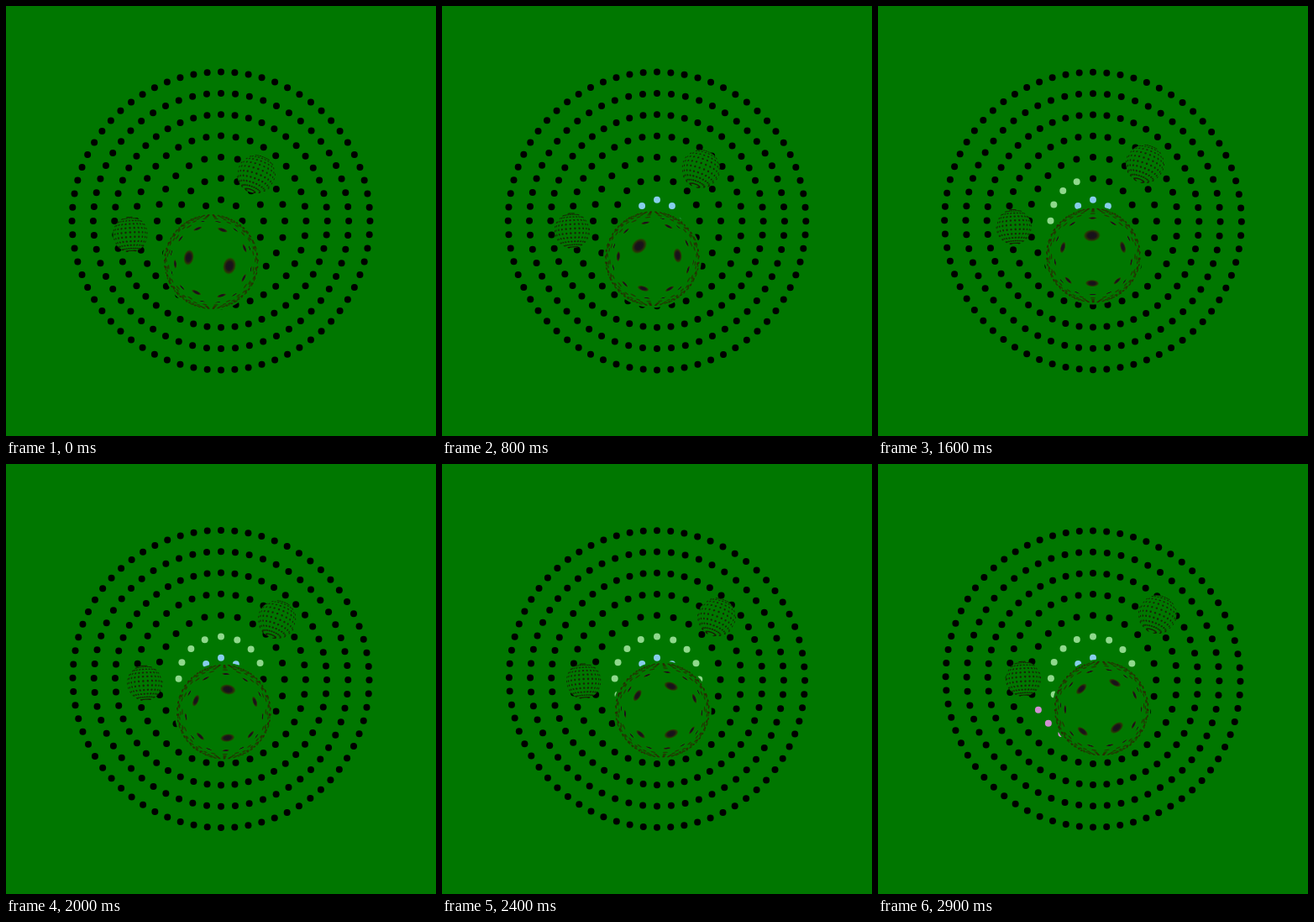
An HTML page with a canvas that plays this animation: 512x512 px, repeating every 3 s.

```html
<!DOCTYPE html>
<html lang="en">
<head>
<meta charset="utf-8">
<title>Dot rings and spheres</title>
<style>
  html, body { margin: 0; width: 100%; height: 100%; overflow: hidden; background: #007700; }
  canvas { display: block; width: 512px; height: 512px; }
</style>
</head>
<body>
<canvas id="stage" width="512" height="512"></canvas>
<script>
const ctx = document.getElementById('stage').getContext('2d');
const TAU = Math.PI * 2;
const GREEN = '#007700';
const LOOP = 3000, STEP = 100;
const COUNTS = [8, 16, 24, 36, 48, 56, 68];
const LIT = ['#87ceeb', '#8fd98c', '#d08fd2'];

// soft dark spot of radius 1, drawn scaled
const spot = ctx.createRadialGradient(0, 0, 0, 0, 0, 1);
spot.addColorStop(0, '#17101c');
spot.addColorStop(0.5, '#1b1418');
spot.addColorStop(0.78, 'rgba(52,34,8,0.75)');
spot.addColorStop(1, 'rgba(60,50,0,0)');

function disc(x, y, r, fill) {
  ctx.fillStyle = fill;
  ctx.beginPath();
  ctx.arc(x, y, r, 0, TAU);
  ctx.fill();
}

function blob(x, y, angle, rx, ry, fill) {
  ctx.save();
  ctx.translate(x, y);
  ctx.rotate(angle);
  ctx.scale(rx, ry);
  disc(0, 0, 1, fill);
  ctx.restore();
}

// rings tilt slowly about both axes; dots light up one per step,
// clockwise from the bottom, ring after ring
function rings(n) {
  const ax = 0.0035 * n, ay = 0.0052 * n;
  let index = 0;
  COUNTS.forEach((count, k) => {
    const r = 25.35 * (k + 1);
    for (let i = 0; i < count; i++, index++) {
      const a = i / count * TAU;
      const x = -r * Math.sin(a), y = r * Math.cos(a);
      disc(256 + x * Math.cos(ay),
           256 + y * Math.cos(ax) + x * Math.sin(ax) * Math.sin(ay),
           4, index < n ? LIT[k] : '#000');
    }
  });
}

// large ball: a bowed lattice of spots, squeezed towards the rim
function bigBall(n) {
  const R = 58.5, row = 1.32;
  const cx = 244.5 + 0.742 * n, cy = 304.5 - 0.468 * n;
  const ox = -0.59 + 0.0348 * n, oy = -0.11 - 0.0235 * n;
  disc(cx, cy, R, GREEN);
  for (let i = -10; i <= 10; i++) {
    const bow = (0.21 * i * i) % row;
    for (let j = -9; j <= 9; j++) {
      const x = ox + i * 1.02, y = oy + j * row + bow;
      const q = Math.hypot(x, y);
      if (q > 11 || q < 1e-6) continue;
      const u = (Math.sqrt(1 + 4 * q * q) - 1) / (2 * q);
      const flat = 1 - u * u;
      const rx = Math.max(0.21 * R * flat * flat / (1 + u * u), 0.65);
      const ry = Math.max(0.21 * R * flat, 1.3);
      blob(cx + x / q * u * R, cy + y / q * u * R, Math.atan2(y, x), rx, ry,
           u < 0.84 ? spot : 'rgba(48,34,4,0.75)');
    }
  }
}

// small ball: latitude and longitude dots on a turning sphere
function smallBall(cx, cy, R, roll, tilt, spin) {
  disc(cx, cy, R, GREEN);
  const step = TAU / 24;
  const cr = Math.cos(roll), sr = Math.sin(roll);
  const ct = Math.cos(tilt), st = Math.sin(tilt);
  for (let i = -5; i <= 5; i++) {
    const lat = i * step;
    for (let j = 0; j < 24; j++) {
      const lon = j * step + spin;
      const x = Math.cos(lat) * Math.sin(lon);
      const y0 = Math.sin(lat), z0 = Math.cos(lat) * Math.cos(lon);
      const y = y0 * ct - z0 * st, z = y0 * st + z0 * ct;
      if (z < 0.08) continue;
      const px = x * cr - y * sr, py = x * sr + y * cr;
      blob(cx + px * R, cy + py * R, Math.atan2(py, px),
           Math.max(1.25 * z, 0.5), 1.25, 'rgba(28,22,6,0.82)');
    }
  }
}

function draw(n) {
  ctx.fillStyle = GREEN;
  ctx.fillRect(0, 0, 512, 512);
  rings(n);
  smallBall(298 + 1.3 * n - 0.0035 * n * n, 200.3 - 0.82 * n + 0.003 * n * n,
            22.7, 0.35, 0.3, 0.022 * n);
  smallBall(148 + 0.862 * n, 272 - 0.56 * n, 20.8, -0.06, 0.12, 0.022 * n);
  bigBall(n);
}

const start = performance.now();
function tick() {
  draw(Math.floor((performance.now() - start) % LOOP / STEP));
  requestAnimationFrame(tick);
}
tick();
</script>
</body>
</html>
```
